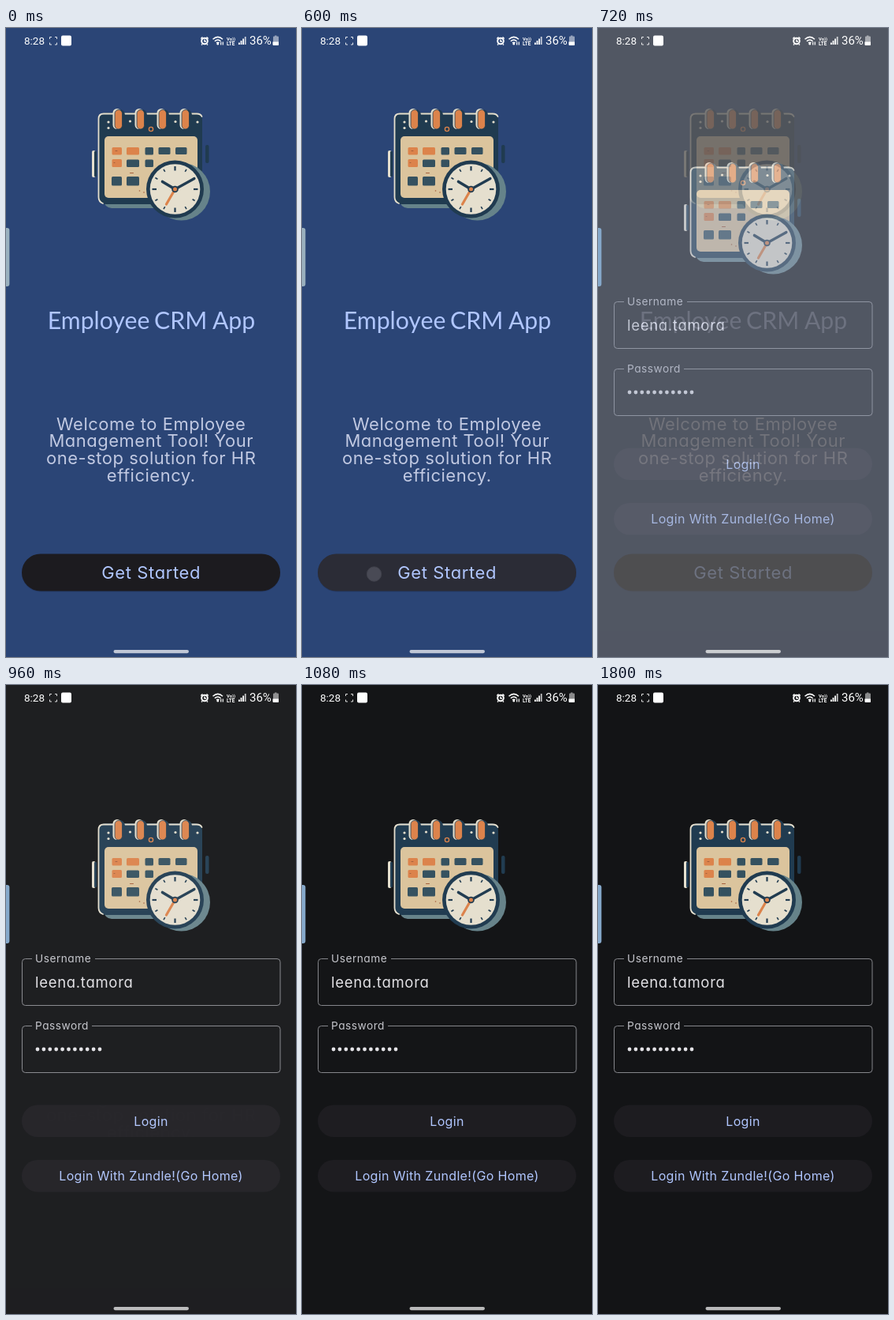
An HTML page that plays this animation: 368x796 px, repeating every 1.92 s.

```html
<!DOCTYPE html>
<html lang="en">
<head>
<meta charset="utf-8">
<title>Employee app login</title>
<style>
  html, body { margin: 0; width: 100%; height: 100%; overflow: hidden; background: #131416; }
  svg { display: block; width: 368px; height: 796px; }
  text { font-family: Inter, sans-serif; font-feature-settings: "cv11"; font-optical-sizing: none; }
  .mid { text-anchor: middle; }
  .title { font: 30.2px Lato, sans-serif; fill: #b0c6ff; }
  .body { font-size: 22px; letter-spacing: .5px; fill: #c1c9e2; }
  .action { font-size: 22px; letter-spacing: .6px; fill: #b0c6ff; }
  .button { font-size: 16px; letter-spacing: .35px; fill: #b0c6ff; }
  .label { font-size: 13.7px; letter-spacing: .5px; fill: #c5c6cc; }
  .value { font-size: 18.5px; letter-spacing: .7px; fill: #e3e2e6; }
  .status text { font-family: Roboto, sans-serif; fill: #fff; }
</style>
</head>
<body>
<svg viewBox="0 0 368 796">
  <defs>
    <clipPath id="pill"><rect x="20" y="665.5" width="328" height="47" rx="23.5"/></clipPath>
    <g id="calendar"></g>
  </defs>

  <rect width="368" height="796" fill="#fdfbff"/>

  <g id="welcome">
    <rect width="368" height="796" fill="#2b4576"/>
    <use href="#calendar"/>
    <text class="title mid" x="184.5" y="381">Employee<tspan dx="-2"> CRM App</tspan></text>
    <g class="body mid">
      <text x="184.2" y="508.5">Welcome to Employee</text>
      <text x="184.2" y="530.3">Management Tool! Your</text>
      <text x="184.2" y="552.1">one-stop solution for HR</text>
      <text x="184.2" y="573.9">efficiency.</text>
    </g>
    <rect x="20" y="666.5" width="328" height="47" rx="23.5" fill="#1c2c50" opacity=".4"/>
    <rect x="20" y="665.5" width="328" height="47" rx="23.5" fill="#1c1b1f"/>
    <g clip-path="url(#pill)">
      <circle id="ripple" cx="92" cy="691" fill="#b0c6ff" opacity=".1"/>
    </g>
    <text class="action mid" x="184.2" y="697">Get Started</text>
    <circle id="touch" cx="91.5" cy="691" r="9.2" fill="#494a55" stroke="#41424c"/>
  </g>

  <g id="login">
    <rect width="368" height="796" fill="#131416"/>
    <use href="#calendar" y="68"/>
    <g fill="none" stroke="#85868b">
      <path d="M113 346.5H344a4 4 0 0 1 4 4V401.5a4 4 0 0 1-4 4H24.5a4 4 0 0 1-4-4V350.5a4 4 0 0 1 4-4H33"/>
      <path d="M109 431.5H344a4 4 0 0 1 4 4V486.5a4 4 0 0 1-4 4H24.5a4 4 0 0 1-4-4V435.5a4 4 0 0 1 4-4H33"/>
    </g>
    <text class="label" x="37" y="351">Username</text>
    <text class="value" x="37" y="382.5">leena.tamora</text>
    <text class="label" x="37" y="436">Password</text>
    <path d="M40 461H119.5" stroke="#e3e2e6" stroke-width="4.8" stroke-linecap="round" stroke-dasharray="0 7.9"/>
    <g fill="#1d1c20">
      <rect x="20" y="531.5" width="328" height="40.5" rx="20.2"/>
      <rect x="20" y="601" width="328" height="40.5" rx="20.2"/>
    </g>
    <text class="button mid" x="184" y="557.5">Login</text>
    <text class="button mid" x="184" y="627">Login With Zundle!(Go Home)</text>
  </g>

  <g class="status" fill="#fff">
    <text x="23" y="21" font-size="13.5">8:28</text>
    <path d="M55.5 14V11.5H58M62 11.5H64.5V14M64.5 18.5V21H62M58 21H55.5V18.5" fill="none" stroke="#fff" opacity=".85"/>
    <rect x="70" y="9.5" width="13" height="13" rx="2"/>
    <g fill="none" stroke="#fff" stroke-width="1.5">
      <circle cx="252" cy="16.5" r="3.8" stroke-width="2"/>
      <path d="M247.3 13.5L249.5 11.5M256.7 13.5L254.5 11.5M249 20.5L248 21.5M255 20.5L256 21.5M252 14.5V17H254"/>
      <path d="M262.5 14.2Q268.8 8.5 275 14.2M264.8 16.7Q268.8 13.2 272.5 16.7M267 19Q268.8 17.5 270.5 19"/>
      <path d="M272.7 17.5V21.5M275.3 17.5V21.5" stroke-width="1.2"/>
    </g>
    <circle cx="268.8" cy="20.3" r="1.3"/>
    <text x="280" y="15.5" font-size="5.8" font-weight="700">Vo))</text>
    <text x="280" y="22" font-size="6.3" font-weight="700">LTE</text>
    <path d="M295 18.5h1.8V21H295zM297.6 16h1.8v5h-1.8zM300.2 13.5h1.8V21h-1.8z"/>
    <path d="M302.8 11h1.8V21h-1.8z" opacity=".75"/>
    <text x="309" y="21.3" font-size="15">36%</text>
    <path d="M339.5 10.5h1.5V9.5h2.5v1h1.500a1 1 0 0 1 1 1v9.5a1 1 0 0 1-1 1h-5a1 1 0 0 1-1-1V11.500z" opacity=".5"/>
    <path d="M338.5 17.5H346V21a1 1 0 0 1-1 1h-5.500a1 1 0 0 1-1-1z"/>
  </g>
  <rect id="edge" x="-6" y="253" width="10.4" height="74" rx="3"/>
  <rect x="136.5" y="787" width="95.5" height="4.2" rx="2.1" fill="#fff" opacity=".7"/>
</svg>

<script>
const LOOP = 1920, STEP = 120;
const NAVY = "#203b50", SLATE = "#35515f", CREAM = "#e5dfce", ORANGE = "#dc834b", SHADE = "#66838a";
const byId = id => document.getElementById(id);

const rect = (x, y, w, h, r, fill, extra = "") =>
  `<rect x="${x}" y="${y}" width="${w}" height="${h}" rx="${r}" fill="${fill}" ${extra}/>`;
const disc = (x, y, r, fill, extra = "") =>
  `<circle cx="${x}" cy="${y}" r="${r}" fill="${fill}" ${extra}/>`;
const line = (d, color, width) =>
  `<path d="${d}" fill="none" stroke="${color}" stroke-width="${width}" stroke-linecap="round"/>`;

function calendarArt() {
  const ring = x =>
    rect(x - 5, 103, 14, 27, 7, NAVY) +
    rect(x - 6.5, 102, 11, 26, 5.5, CREAM) +
    rect(x - 4, 103.5, 9.5, 24.5, 4.7, ORANGE, `stroke="${NAVY}" stroke-width=".8"`);
  const cell = (x, y, w, h, fill = SLATE) => rect(x, y, w, h, 1.5, fill);
  const tick = i =>
    `<path d="M214.5 175v${i % 3 ? 3.5 : 5.5}" stroke="${NAVY}" stroke-width="${i % 3 ? 1.6 : 2.2}" transform="rotate(${i * 30} 214.5 204)"/>`;

  return [
    rect(109, 155, 4.5, 34, 2, CREAM), rect(112, 156, 3, 32, 1, NAVY),
    rect(253, 148, 4.5, 23, 2, NAVY),
    rect(124, 190, 90, 38, 10, SHADE),
    rect(117, 107, 132, 116, 9, NAVY),
    line("M123 222Q117.5 220 117.5 214V115Q117.5 108.5 124 108.5H242Q247 108.5 248.5 112", CREAM, 1.8),
    rect(125, 137, 118, 78, 5, "#dbc49d"),
    ...[142, 170, 198, 227].map(ring),
    ...[[130, 119], [130, 126.5], [157.5, 118], [215, 118.5], [243, 119]].map(([x, y]) => disc(x, y, 1.6, CREAM)),
    disc(184, 128, 2.6, "none", `stroke="${ORANGE}" stroke-width="1.4"`),
    cell(134.5, 151, 12.5, 9.5, ORANGE), cell(153, 151, 16, 9.5, ORANGE),
    cell(176.5, 151, 10.5, 9.5), cell(193.5, 151, 15, 9), cell(215, 151, 14.5, 9),
    cell(134.5, 166, 12.5, 10, ORANGE), cell(153, 166.5, 16, 9.5), cell(176.5, 166.5, 10.5, 9.5),
    cell(134, 188, 13, 11.5), cell(153, 188, 16, 11.5),
    line("M157.5 183.5h4M139 155.5h2M137 170.5h1", "#a45f3b", 1),
    disc(169.5, 206, .8, "#a45f3b"), disc(175, 208, .8, "#a45f3b"),
    disc(222.5, 207, 36.5, SHADE),
    disc(214.5, 204, 36.5, NAVY),
    disc(214.5, 204, 31.8, CREAM),
    ...Array.from({ length: 12 }, (_, i) => tick(i)),
    line("M214.5 204L203.5 223", ORANGE, 3.2),
    line("M214.5 204L198.5 194.5", NAVY, 3.6),
    line("M214.5 204L239 190.5", NAVY, 3.2),
    disc(214.5, 204, 3.4, ORANGE, `stroke="${NAVY}" stroke-width="1.8"`)
  ].join("");
}

const clamp = v => Math.min(1, Math.max(0, v));

// Standard easing, cubic-bezier(.4, 0, .2, 1), solved by bisection.
function ease(x) {
  if (x <= 0 || x >= 1) return clamp(x);
  let lo = 0, hi = 1, s = .5;
  for (let i = 0; i < 20; i++) {
    s = (lo + hi) / 2;
    const bx = 1.2 * s * (1 - s) ** 2 + .6 * s * s * (1 - s) + s ** 3;
    if (bx < x) lo = s; else hi = s;
  }
  return s * s * (3 - 2 * s);
}

function draw(now) {
  const t = Math.floor(now % LOOP / STEP) * STEP;
  const leaving = t >= 720;
  const fade = leaving ? ease((t - 470) / 680) : 0;
  byId("welcome").setAttribute("opacity", 1 - fade);
  byId("login").setAttribute("opacity", fade);
  byId("ripple").setAttribute("r", leaving ? 0 : 270 * ease((t - 360) / 225));
  byId("touch").setAttribute("opacity", t >= 480 && !leaving ? 1 : 0);
  byId("edge").setAttribute("fill", leaving ? "#86a9cb" : "#9ab0be");
}

byId("calendar").innerHTML = calendarArt();
const start = performance.now();
function tick() {
  draw(performance.now() - start);
  requestAnimationFrame(tick);
}
tick();
</script>
</body>
</html>
```
